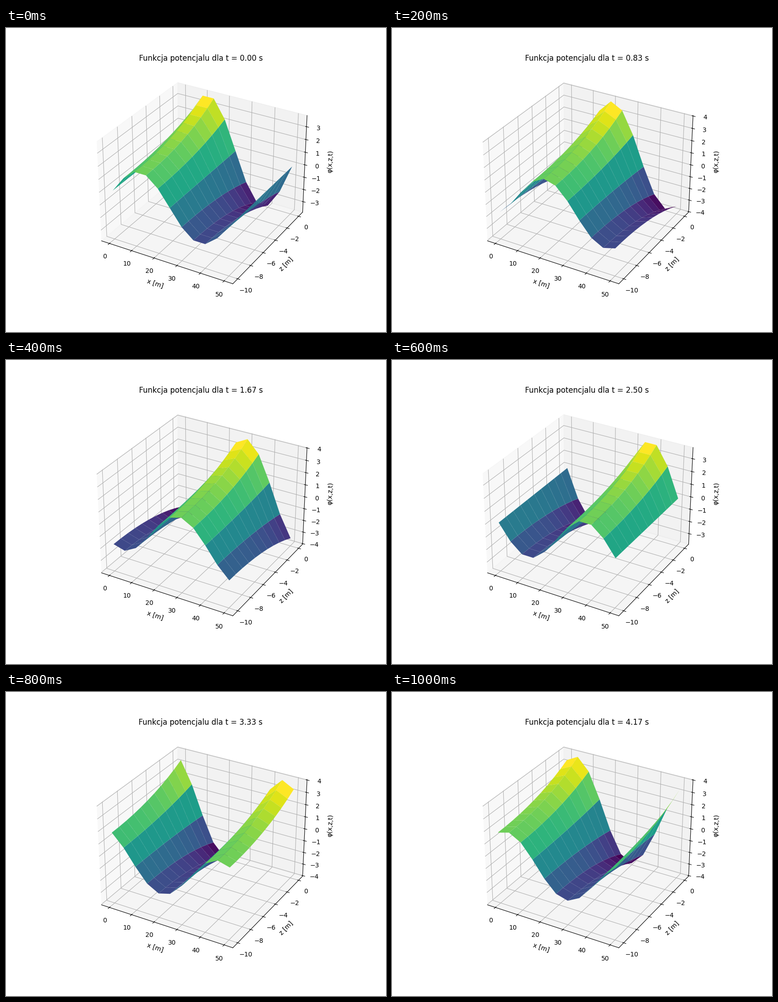
Recreate the animation shown at these times as a matplotlib script. Size 837 by 669 pixels, loop 1200 ms.

```python
import numpy as np
import matplotlib.pyplot as plt
from matplotlib.animation import FuncAnimation

WIDTH, HEIGHT, DPI = 837, 669, 100
FRAMES, INTERVAL = 6, 200

# Linear wave: height, length, period and water depth
G, WAVE_HEIGHT, LENGTH, PERIOD, DEPTH = 9.81, 1.0, 50.0, 5.0, 10.0
K = 2 * np.pi / LENGTH
OMEGA = 2 * np.pi / PERIOD

X, Z = np.meshgrid(np.linspace(0, LENGTH, 11), np.linspace(-DEPTH, 0, 11))


def potential(t):
    decay = np.cosh(K * (Z + DEPTH)) / np.cosh(K * DEPTH)
    return G * WAVE_HEIGHT / (2 * OMEGA) * decay * np.sin(K * X - OMEGA * t)


def padded(low, high, margin):
    """Widen a range by a data margin, then by the 1/48 pane margin."""
    pad = (high - low) * margin
    low, high = low - pad, high + pad
    pane = (high - low) / 48
    return low - pane, high + pane


# The tiny excess keeps the pixel size from being truncated
fig = plt.figure(figsize=((WIDTH + 1e-6) / DPI, (HEIGHT + 1e-6) / DPI), dpi=DPI)
ax = fig.add_subplot(projection="3d")


def draw(frame):
    t = frame * PERIOD / FRAMES
    phi = potential(t)
    ax.clear()
    ax.plot_surface(X, Z, phi, cmap="viridis")
    ax.set_xlim(*padded(0, LENGTH, 0.05))
    ax.set_ylim(*padded(-DEPTH, 0, 0.05))
    ax.set_zlim(*padded(phi.min(), phi.max(), 0))
    ax.set_xlabel("x [m]")
    ax.set_ylabel("z [m]")
    ax.set_zlabel("φ(x,z,t)")
    ax.set_title(f"Funkcja potencjalu dla t = {t:.2f} s")
    return []


anim = FuncAnimation(fig, draw, frames=FRAMES, init_func=lambda: draw(0),
                     interval=INTERVAL, repeat=True, repeat_delay=0)
plt.show()
```
